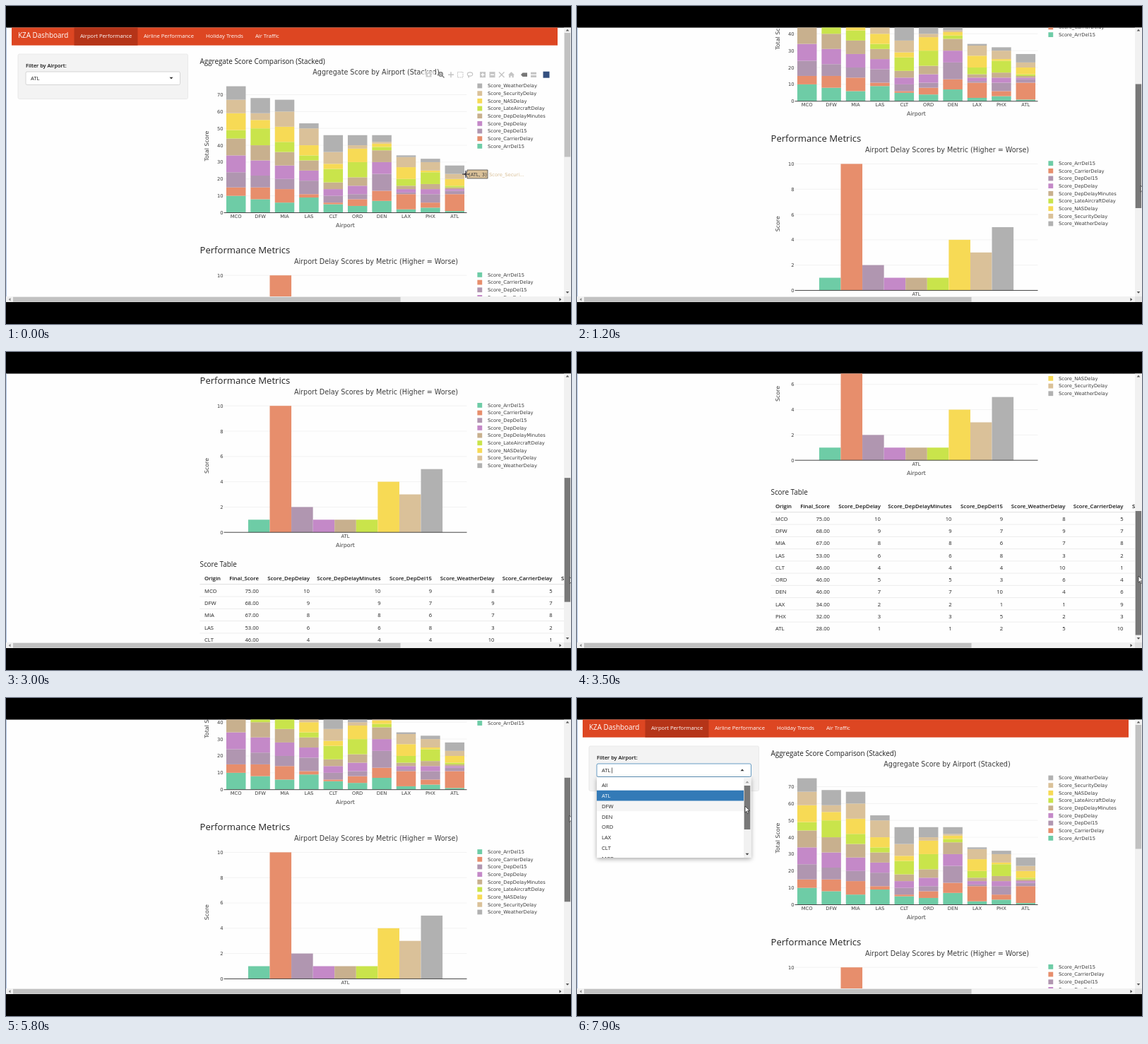
Write an HTML page that moves like this. It is 800 px wide and 450 px high and loops after 8 s.

```html
<!DOCTYPE html>
<html lang="en">
<head>
<meta charset="utf-8">
<title>Airport dashboard</title>
<style>
html, body { margin: 0; width: 100%; height: 100%; overflow: hidden; background: #000; }
svg { display: block; width: 800px; height: 450px; }
text { font: 7.65px "Open Sans", "Noto Sans", sans-serif; fill: #222; white-space: pre; }
.h4 { font-size: 9.9px; }
.h3 { font-size: 13.1px; }
.b { font-weight: 600; font-size: 7.35px; fill: #111; }
.th { font-size: 7.75px; }
.w { fill: #fff; }
.tick, .axis, .title { font-family: "DejaVu Sans", Verdana, sans-serif; fill: #3c3c3c; }
.tick { font-size: 6.74px; }
.axis { font-size: 7.86px; }
.title { font-size: 9.6px; }
</style>
</head>
<body>
<svg viewBox="0 0 800 450" id="stage"></svg>
<script>
const metrics = ['ArrDel15', 'CarrierDelay', 'DepDel15', 'DepDelay', 'DepDelayMinutes',
  'LateAircraftDelay', 'NASDelay', 'SecurityDelay', 'WeatherDelay'];
const colors = ['#6ecca6', '#e78e6c', '#b096b0', '#c489c8', '#c8b08e',
  '#c9e44b', '#f7da55', '#dac199', '#b1b1b1'];
// Scores per airport in the order of metrics; DepDelayMinutes always equals DepDelay.
const scores = {
  MCO: [10, 5, 9, 10, 5, 10, 8, 8], DFW: [8, 7, 7, 9, 10, 5, 4, 9],
  MIA: [6, 8, 6, 8, 6, 9, 9, 7], LAS: [9, 2, 8, 6, 3, 6, 10, 3],
  CLT: [5, 1, 4, 4, 8, 3, 7, 10], ORD: [4, 4, 3, 5, 9, 8, 2, 6],
  DEN: [7, 6, 10, 7, 2, 2, 1, 4], LAX: [2, 9, 1, 2, 4, 7, 6, 1],
  PHX: [3, 3, 5, 3, 7, 1, 5, 2], ATL: [1, 10, 2, 1, 1, 4, 3, 5]
};
const airports = Object.keys(scores).map(name => {
  const v = scores[name].slice();
  v.splice(4, 0, v[3]);
  return { name, v, total: v.reduce((a, b) => a + b) };
});

const rect = (x, y, w, h, fill, more = '') =>
  `<rect x="${x}" y="${y}" width="${w}" height="${h}" fill="${fill}" ${more}/>`;
const text = (x, y, s, cls = '', anchor = 'start', more = '') =>
  `<text x="${x}" y="${y}" class="${cls}" text-anchor="${anchor}" ${more}>${s}</text>`;
const path = (d, fill, more = '') => `<path d="${d}" fill="${fill}" ${more}/>`;
const line = (x1, x2, y, color, w = 1) => path(`M${x1} ${y}H${x2}`, 'none', `stroke="${color}" stroke-width="${w}"`);

const left = 308.5, plotW = 344, right = left + plotW;

function frame(zero, unit, step, max, title, titleY, yLabel, yMid) {
  let s = '';
  for (let v = 0; v <= max; v += step) {
    const y = zero - v * unit;
    if (v) s += line(left, right, y, '#eee', .7);
    s += text(307.5, y + 2.5, v, 'tick', 'end');
  }
  return s + text(524, titleY, title, 'title', 'middle') +
    text(480.5, zero + 20.7, 'Airport', 'axis', 'middle') +
    text(0, 0, yLabel, 'axis', 'middle', `transform="translate(287.3 ${yMid}) rotate(-90)"`);
}

function legend(y0, order) {
  return order.map((m, i) => {
    const y = y0 + i * 10.67;
    return rect(667.4, y - 3.4, 6.8, 6.8, colors[m]) + text(682, y + 2.4, 'Score_' + metrics[m], 'tick');
  }).join('');
}

function stackedChart() {
  const zero = 292.5, unit = 2.386, slot = plotW / 10;
  let s = frame(zero, unit, 10, 70, 'Aggregate Score by Airport (Stacked)', 97, 'Total Score', 198);
  airports.forEach((a, i) => {
    let y = zero;
    a.v.forEach((n, m) => {
      y -= n * unit;
      s += rect(left + slot * (i + .1), y, slot * .8, n * unit, colors[m]);
    });
    s += text(left + slot * (i + .5), 300.2, a.name, 'tick', 'middle');
  });
  return s + line(left, right, zero, '#444') + legend(113, [8, 7, 6, 5, 4, 3, 2, 1, 0]);
}

function metricChart() {
  const zero = 560.2, unit = 17.9, w = plotW * .8 / 9;
  let s = frame(zero, unit, 2, 10, 'Airport Delay Scores by Metric (Higher = Worse)', 365, 'Score', 466);
  airports[9].v.forEach((n, m) => {
    s += rect(left + plotW * .1 + m * w, zero - n * unit, w, n * unit, colors[m]);
  });
  return s + line(left, right, zero, '#444') + text(480.5, 567.8, 'ATL', 'tick', 'middle') +
    legend(380.4, [0, 1, 2, 3, 4, 5, 6, 7, 8]);
}

function table() {
  const cols = [[430, 3], [530.5, 4], [603, 2], [691.5, 8], [773.5, 1]];
  const head = (x, s, anchor) => text(x, 627.7, s, 'b th', anchor);
  let s = head(281, 'Origin') + head(358, 'Final_Score', 'end') +
    head(786, 'Score_NASDelay') + line(274.5, 800, 633.8, '#ddd', 1.1);
  for (const [x, m] of cols) s += head(x, 'Score_' + metrics[m], 'end');
  airports.forEach((a, i) => {
    const y = 645.8 + 17.25 * i;
    s += text(281, y, a.name) + text(358, y, a.total.toFixed(2), '', 'end');
    for (const [x, m] of cols) s += text(x, y, a.v[m], '', 'end');
    if (i < 9) s += line(274.5, 800, y + 5.3, '#e4e4e4', .7);
  });
  return s;
}

function navbar() {
  return rect(8, 30, 773, 25.7, '#dd4622') + rect(96.5, 30, 90, 25.7, '#b53418') +
    text(17, 45.4, 'KZA Dashboard', 'h4 w') +
    [[105, 'Airport Performance'], [195, 'Airline Performance'], [283, 'Holiday Trends'], [353, 'Air Traffic']]
      .map(([x, s]) => text(x, 44.7, s, 'w')).join('');
}

function filter() {
  return rect(17, 68, 240.5, 63.5, '#f3f3f3', 'rx="2" stroke="#e3e3e3" stroke-width=".7"') +
    text(28, 87, 'Filter by Airport:', 'b') +
    rect(28, 93, 218.5, 18.5, '#fff', 'id="field" rx="2" stroke="#ccc" stroke-width=".8"') +
    text(35, 105, 'ATL') +
    path('', '#333', 'id="caret"');
}

const rowH = 14.75, listTop = 116;
function dropdown() {
  const names = ['All', 'ATL', 'DFW', 'DEN', 'ORD', 'LAX', 'CLT', 'MCO'];
  return `<g id="list" clip-path="url(#listClip)">` +
    rect(28, 112, 218.5, 114, '#fff') + rect(28, 0, 208, rowH, '#f5f5f5', 'id="hover"') +
    rect(28, listTop + rowH, 208, rowH, '#337ab7') +
    names.map((n, i) => text(35, listTop + 10.3 + i * rowH, n, i === 1 ? 'w' : '')).join('') +
    rect(236, 113, 10, 113, '#f1f1f1') + rect(236.7, 124, 8.6, 62, '#787878') +
    path('M238.6 120.3h4.8l-2.4-2.8z', '#999') + path('M238.6 219.7h4.8l-2.4 2.8z', '#444') +
    '</g>' + path('M49.6 98.5v8', 'none', 'id="cursorBar" stroke="#222" stroke-width=".7"');
}

function modebar() {
  const stroke = (d, c = '#c4c4c4') => path(d, 'none', `stroke="${c}" stroke-width="1.4"`);
  return '<g id="modebar">' + rect(589, 92, 18, 11, '#fff', 'opacity=".6"') +
    rect(594.5, 94.5, 8, 6, '#ccc') + `<circle cx="598.5" cy="97.5" r="1.7" fill="#fff"/>` +
    `<circle cx="615.5" cy="96.5" r="2.7" fill="none" stroke="#777" stroke-width="1.4"/>` +
    stroke('M617.5 98.5l3 3M614 96.5h3', '#777') +
    stroke('M626 97.2h8M630 93.2v8') +
    path('M639.5 93.5h7.5v7.5h-7.5z', 'none', 'stroke="#bbb" stroke-dasharray="1.5 1"') +
    `<ellipse cx="657" cy="96.5" rx="3.7" ry="2.6" fill="none" stroke="#c4c4c4" stroke-width="1.1"/>` +
    stroke('M654.5 98.5l1 3') +
    rect(671, 93.2, 8, 8, '#c4c4c4') + stroke('M672.5 97.2h5M675 94.7v5', '#fff') +
    rect(684.5, 93.2, 8, 8, '#c4c4c4') + stroke('M686 97.2h5', '#fff') +
    stroke('M698 93.5l7.5 7.5M705.5 93.5l-7.5 7.5') +
    path('M711 97.5l4.5-4.3 4.5 4.3h-1.2v3.7h-2.3v-2.5h-2v2.5h-2.3v-3.7z', '#c4c4c4') +
    path('M729 97.2l2.5-2.8h6.5v5.6h-6.5z', '#777') +
    rect(743, 93.7, 8, 3, '#c4c4c4') + rect(743, 98, 8, 3, '#c4c4c4') +
    rect(760.5, 92.7, 9, 9, '#34507f') + '</g>';
}

function tooltip() {
  return '<g id="tip">' +
    path('M648.5 238l4.5-3v-3h29v12h-29v-3z', '#dac199', 'stroke="#444" stroke-width=".8"') +
    text(655, 240.5, '(ATL, 3)', 'tick') +
    text(684, 240.5, 'Score_Securi...', 'tick', 'start', 'style="fill:#dac199"') + '</g>';
}

function scrollbars() {
  return rect(790, 30.6, 10, 380.4, '#f1f1f1') + rect(790.7, 38, 8.4, 175.5, '#c1c1c1', 'id="thumb"') +
    path('M792.7 35.5h4.6l-2.3-2.8z', '#555') + path('M792.7 404h4.6l-2.3 2.8z', '#555') +
    rect(0, 411, 790, 8, '#f1f1f1') + rect(10, 411.8, 548.5, 6.8, '#c1c1c1') +
    path('M6.5 413v4.6l-2.8-2.3z', '#888') + path('M783.5 413v4.6l2.8-2.3z', '#444') +
    rect(790, 411, 10, 8, '#e2e2e2');
}

const $ = id => document.getElementById(id);
$('stage').innerHTML =
  `<clipPath id="view"><rect x="0" y="30.6" width="790" height="380.4"/></clipPath>
   <clipPath id="listClip"><rect x="28" y="112" width="218.5" height="114"/></clipPath>` +
  rect(0, 30.6, 800, 388.4, '#fefefe') +
  '<g clip-path="url(#view)"><g id="page">' + navbar() + filter() +
  text(274.5, 82.2, 'Aggregate Score Comparison (Stacked)', 'h4') + stackedChart() + modebar() + tooltip() +
  text(274.5, 349.6, 'Performance Metrics', 'h3') + metricChart() +
  text(274.5, 609, 'Score Table', 'h4') + table() +
  rect(28, 112, 218.5, 114, '#fff', 'id="shadow" style="filter:drop-shadow(0 2px 3px #0005)"') +
  dropdown() + '</g></g>' + rect(0, 30.6, 1, 380.4, '#b4c8e4') + scrollbars() +
  path('M0 0v9.2l2.1-2 1.5 3.4 1.5-.7-1.5-3.3h2.9z', '#fff', 'id="arrow" stroke="#222" stroke-width=".7"') +
  path('M646 238h10M651 233v10', 'none', 'id="cross" stroke="#223" stroke-width="1.2"');

// time, page scroll, pointer x, pointer y
const keys = [
  [0, 0, 651, 238], [100, 0, 651, 238], [400, 0, 797, 188], [800, 78.5, 798, 220.5],
  [1600, 237, 798.5, 287.5], [2800, 237, 798.5, 287.5], [3300, 407, 798, 365], [3500, 407, 795, 317],
  [4500, 407, 797, 300], [5500, 407, 798, 278], [6000, 0, 798, 92], [6400, 0, 85, 85],
  [6900, 0, 150, 100], [7200, 0, 150, 101], [7900, 0, 238, 153]
];
function pose(t) {
  const i = keys.findIndex(k => k[0] > t);
  if (i < 0) return keys[keys.length - 1].slice(1);
  const a = keys[i - 1], b = keys[i], p = (t - a[0]) / (b[0] - a[0]);
  return [1, 2, 3].map(n => a[n] + (b[n] - a[n]) * p);
}
const clamp = v => Math.max(0, Math.min(1, v));
const show = (id, on) => $(id).setAttribute('visibility', on ? 'visible' : 'hidden');

function thumbColor(t) {
  if (t < 400 || t > 6000) return '#c1c1c1';
  const released = t >= 1600 && t < 2800;
  return released ? '#a8a8a8' : '#787878';
}

function draw(now) {
  const t = Math.floor(now % 8000 / 100) * 100;
  const [scroll, x, y] = pose(t);
  const open = t >= 7000;
  $('page').setAttribute('transform', `translate(0 ${-scroll})`);
  $('thumb').setAttribute('y', 38 + scroll * .4595);
  $('thumb').setAttribute('fill', thumbColor(t));
  $('arrow').setAttribute('transform', `translate(${x} ${y})`);
  show('arrow', t > 100);
  show('cross', t <= 100);
  show('tip', t <= 100);
  const fade = t < 3000 ? (500 - t) / 300 : Math.min((t - 6000) / 200, (6600 - t) / 350);
  $('modebar').setAttribute('opacity', clamp(fade));
  for (const id of ['list', 'shadow']) show(id, open);
  show('cursorBar', open && t % 1000 >= 500 || t === 7000);
  $('field').setAttribute('stroke', open ? '#3f83b5' : '#ccc');
  $('caret').setAttribute('d', open ? 'M231.5 103.3h5l-2.5-2.8z' : 'M231.5 100.7h5l-2.5 2.8z');
  const row = Math.floor((y - listTop) / rowH);
  show('hover', open && row >= 0);
  $('hover').setAttribute('y', listTop + row * rowH);
  requestAnimationFrame(loop);
}
const start = performance.now();
function loop() { draw(performance.now() - start); }
loop();
</script>
</body>
</html>
```
